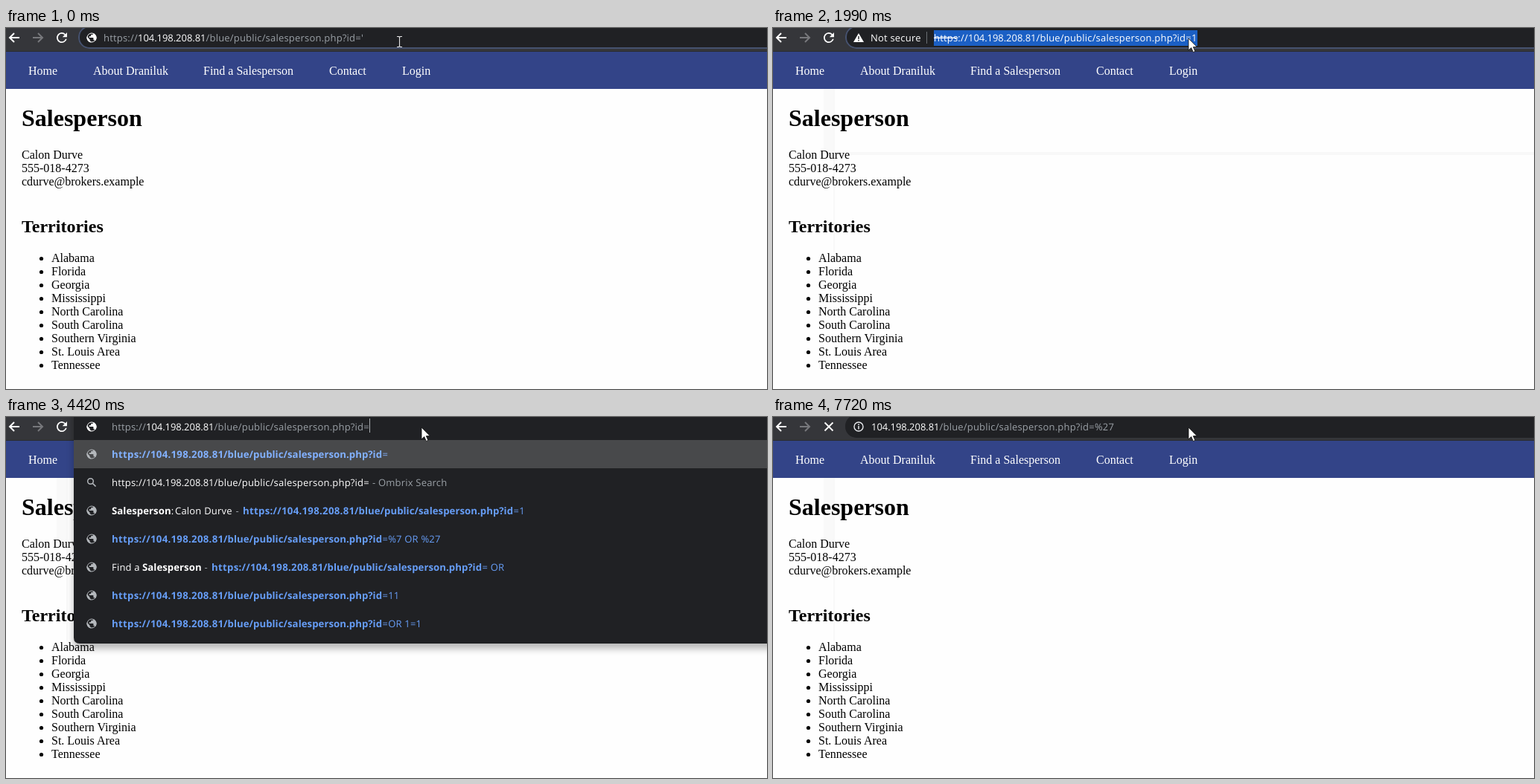
An HTML page that plays this animation: 1022 px wide and 486 px high, repeating every 8 s.

```html
<!DOCTYPE html>
<html lang="en">
<head>
<meta charset="utf-8">
<title>Salesperson page</title>
<style>
  html, body { margin: 0; width: 100%; height: 100%; overflow: hidden; background: #fefefe; }
  svg { display: block; width: 100%; height: 100%; }
  text { white-space: pre; }
  .page { font: 16px "Liberation Serif", serif; fill: #000; }
  .page .h1 { font-size: 32px; font-weight: 700; }
  .page .h2 { font-size: 24px; font-weight: 700; }
  .page .nav { fill: #fff; }
  .ui { font: 13px "Open Sans", sans-serif; letter-spacing: .2px; fill: #fff; }
  .ui text { text-rendering: geometricPrecision; }
  .ui .host { letter-spacing: -.05px; }
  .ui .dim { fill: #9aa0a6; }
  .ui .bold { font-size: 13.2px; font-weight: 700; letter-spacing: .05px; }
  .ui .wide { letter-spacing: .3px; }
  .ui .link { fill: #669df6; }
  .ui .pick { fill: #82b1ff; }
  .ui .strike { text-decoration: line-through; }
  .ui .bad { fill: #f28b82; }
</style>
</head>
<body>
<svg id="stage" viewBox="0 0 1022 486"></svg>
<script>
const NS = 'http://www.w3.org/2000/svg';
const LOOP = 8000;
const HOST = '104.198.208.81';
const PATH = '/blue/public/salesperson.php?id';
const PERSON = 'Calon Durve';
const DARK = '#202124';
const SEAS = 'M11 19.9c-4-.5-7-3.8-7-7.9 0-.6.1-1.2.2-1.8L9 15v1c0 1.1.9 2 2 2zM17.9 17.4c-.3-.8-1-1.4-1.9-1.4h-1v-3c0-.6-.4-1-1-1H8v-2h2c.6 0 1-.4 1-1V7h2c1.1 0 2-.9 2-2v-.4c2.9 1.2 5 4.1 5 7.4 0 2.1-.8 4-2.1 5.4z';
const RELOAD = 'M17.6 6.4A8 8 0 1 0 19.7 14h-2.1A6 6 0 1 1 16.2 7.8L13 11h7V4z';

const stage = document.getElementById('stage');
const layers = [];

function el(parent, tag, attrs, content) {
  const node = document.createElementNS(NS, tag);
  for (const key in attrs) node.setAttribute(key, attrs[key]);
  if (content) node.textContent = content;
  return parent.appendChild(node);
}
const rect = (p, x, y, width, height, fill, more) => el(p, 'rect', { x, y, width, height, fill, ...more });
const line = (p, d, stroke, width = 2) => el(p, 'path', { d, stroke, 'stroke-width': width, fill: 'none' });

// A layer is visible during [from, to, opacity = 1] spans.
function layer(cls, ...spans) {
  const node = el(stage, 'g', { class: cls });
  layers.push({ node, spans });
  return node;
}

// Parts are [class, string, optional x].
function write(p, x, y, parts) {
  const text = el(p, 'text', { x, y });
  for (const [cls, str, at] of parts) el(text, 'tspan', at ? { class: cls, x: at } : { class: cls }, str);
}
function address(p, x, y, tail, cls = 'dim', scheme = [[cls, 'https://']]) {
  write(p, x, y, [...scheme, ['host', HOST, x + 46], [cls, PATH + tail, x + 137.5]]);
}
function shortAddress(p, x, tail) {
  write(p, x, 18, [['host', HOST], ['dim', PATH + tail, x + 91.5]]);
}

function globe(p, y, fill) {
  el(p, 'path', { d: SEAS, fill, transform: `translate(115 ${y}) scale(.82) translate(-12 -12)` });
  el(p, 'circle', { cx: 115, cy: y, r: 6, fill: 'none', stroke: fill });
}
function lens(p, y) {
  el(p, 'circle', { cx: 113.5, cy: y - 1.5, r: 3.8, fill: 'none', stroke: '#b4b8bc', 'stroke-width': 1.5 });
  line(p, `M116.5 ${y + 1.5}l4 4`, '#b4b8bc', 1.7);
}

function panel(rows, ...spans) {
  const g = layer('ui', ...spans);
  const end = 39 + 38 * rows.length;
  el(g, 'path', {
    d: `M91 -20H1060V${end}H99q-8 0 -8 -8z`, fill: DARK,
    style: 'filter: drop-shadow(0 7px 5px rgba(0,0,0,.28))'
  });
  rect(g, 91, 31, 931, 38, '#48494b');
  rows.forEach((row, i) => {
    const y = 50 + 38 * i;
    if (row.search) {
      lens(g, y);
      address(g, 142, y + 5, row.search, '');
      write(g, row.dash, y + 5, [['dim', '- Ombrix Search']]);
    } else {
      globe(g, y, '#b4b8bc');
      write(g, 142, y + 5, row);
    }
  });
}

// Matched address: bold parts, a light "=", then a bold and a light ending.
const hit = (x, strong, light, tone = 'link') => [
  ['bold wide ' + tone, 'https://', x],
  ['bold wide ' + tone, HOST, x + 52],
  ['bold ' + tone, PATH, x + 150],
  [tone, '=', x + 363.5],
  ['bold ' + tone, strong, x + 372.5],
  [tone, light]
];
const seller = (url) => [['bold', 'Salesperson'], ['', ':'], ['', PERSON, 227], ['dim', '-', 308.5], ...url];
const finder = (url) => [['', 'Find a '], ['bold', 'Salesperson', 183], ['dim', '-', 266.5], ...url];

// Page
const page = el(stage, 'g', { class: 'page' });
const say = (p, x, y, str, cls = '') => el(p, 'text', { x, y, class: cls }, str);
rect(page, 0, 0, 1022, 486, '#fefefe');
rect(page, 0, 31, 1022, 51, '#334488');
[[30, 'Home'], [117, 'About Draniluk'], [265, 'Find a Salesperson'], [434, 'Contact'], [532, 'Login']]
  .forEach(([x, str]) => say(page, x, 63, str, 'nav'));

// Faint remains of the list's shadow
rect(layer('', [360, LOOP]), 81, 82, 2, 220, '#f8f8f8');
rect(layer('', [610, LOOP]), 68, 82, 13, 88, '#f9f9f9');
rect(layer('', [610, 3350]), 82, 167, 940, 4, '#f8f8f8');

const body = el(stage, 'g', { class: 'page' });
say(body, 21, 132, 'Salesperson', 'h1');
[PERSON, '555-018-4273', 'cdurve@brokers.example'].forEach((str, i) => say(body, 21, 176 + 18 * i, str));
say(body, 21, 275, 'Territories', 'h2');
['Alabama', 'Florida', 'Georgia', 'Mississippi', 'North Carolina', 'South Carolina',
  'Southern Virginia', 'St. Louis Area', 'Tennessee'].forEach((str, i) => {
  say(body, 61, 315 + 18 * i, str);
  el(body, 'circle', { cx: 47.5, cy: 310.5 + 18 * i, r: 2.6 });
});

// Toolbar
const bar = el(stage, 'g', {});
rect(bar, 0, 0, 1022, 31, '#35363a');
rect(bar, 0, 31, 1022, 1, '#2b2c30');
line(bar, 'M18 13H5.5M11 7l-6 6 6 6', '#fff');
line(bar, 'M36 13h12.5M43 7l6 6-6 6', '#77787c');
rect(bar, 97, -3, 960, 31, DARK, { rx: 15 });
rect(layer('', [0, 120], [1990, 3350]), 98, -2, 960, 29, DARK, { rx: 14, stroke: '#46526f', 'stroke-width': 2 });

el(layer('', [0, 610], [1040, 7600]), 'path', {
  d: RELOAD, fill: '#fff', transform: 'translate(75 13) scale(.87) translate(-12 -12)'
});
line(layer('', [610, 1040], [7600, LOOP]), 'M69.5 7.5l11 11M80.5 7.5l-11 11', '#fff', 1.8);

// Suggestion lists
panel([
  hit(142, '', '', 'pick'),
  { search: '=', dash: 492 },
  seller(hit(318, '', '1')),
  hit(142, '', '%7 OR %27'),
  finder(hit(276, '', ' OR')),
  hit(142, '', '11'),
  hit(142, '', 'OR 1=1')
], [120, 240, .15], [240, 360], [3350, 3500, .15], [3500, 6640]);
panel([
  seller(hit(318, '1', '', 'pick')),
  { search: '=1', dash: 500 },
  finder(hit(276, '1', '1'))
], [360, 610], [610, 760, .15]);
panel([
  hit(142, '%27', '', 'pick'),
  { search: "='", dash: 495 }
], [6640, 7600], [7600, 7720, .15]);

// Address bar icons
globe(layer('', [0, 610], [3350, 7600]), 13, '#fff');

const info = layer('', [610, 1040], [7600, LOOP]);
el(info, 'circle', { cx: 115, cy: 13, r: 6, fill: 'none', stroke: '#e8eaed', 'stroke-width': 1.4 });
line(info, 'M115 9.3v1.6M115 12v4.6', '#e8eaed', 1.5);

const warn = layer('ui', [1040, 3350]);
el(warn, 'path', { d: 'M115 7l7 12h-14z', fill: '#fff' });
line(warn, 'M115 11v4M115 16v1.5', DARK, 1.4);
write(warn, 131, 18, [['', 'Not secure']]);
rect(warn, 206, 5, 1, 16, '#6a6e73');

// Address bar text
address(layer('ui', [0, 120]), 131, 18, "='");
address(layer('ui', [120, 360], [3350, 6640]), 142, 18, '=');
address(layer('ui', [360, 610]), 142, 18, '=1');
shortAddress(layer('ui', [610, 1040]), 132, '=1');
shortAddress(layer('ui', [1040, 1990]), 216, '=1');
const marked = layer('ui', [1990, 2980]);
rect(marked, 216, 3, 354, 21, '#1b5fc4');
address(marked, 216, 18, '=1', '', [['strike', 'https'], ['', '://']]);
address(layer('ui', [2980, 3350]), 216, 18, '=1', 'dim', [['strike bad', 'https'], ['dim', '://']]);
address(layer('ui', [6640, 7600]), 142, 18, "='");
shortAddress(layer('ui', [7600, LOOP]), 132, '=%27');

// Carets
const caret = (x, ...spans) => rect(layer('', ...spans), x, 2, 1, 19, '#a9acb0');
caret(496, [360, 610]);
caret(570, [2980, 3350]);
caret(488, [120, 360], [3350, 3900], [4420, 4950], [5510, 6080]);
caret(491, [6640, 7170]);

// Pointer
const beam = (x, y, ...spans) =>
  line(layer('', ...spans), `M${x - 3} ${y}h2.5l1 1 1-1h2.5M${x + .5} ${y + 1}v12M${x - 3} ${y + 14}h2.5l1-1 1 1h2.5`, '#e6e6e6', 1.1);
beam(528, 11.5, [0, 1690]);
beam(559, 7.5, [1690, 1990]);
el(layer('', [1990, LOOP]), 'path', {
  d: 'M558 14v16l3.7-3.5 2.6 6 2.6-1.1-2.6-5.8h5z', fill: '#fff', stroke: '#111', 'stroke-width': .8
});

const start = performance.now();
function draw() {
  const t = (performance.now() - start) % LOOP;
  for (const { node, spans } of layers) {
    const span = spans.find(([from, to]) => t >= from && t < to);
    node.style.display = span ? '' : 'none';
    if (span) node.style.opacity = span[2] || 1;
  }
  requestAnimationFrame(draw);
}
draw();
</script>
</body>
</html>
```
